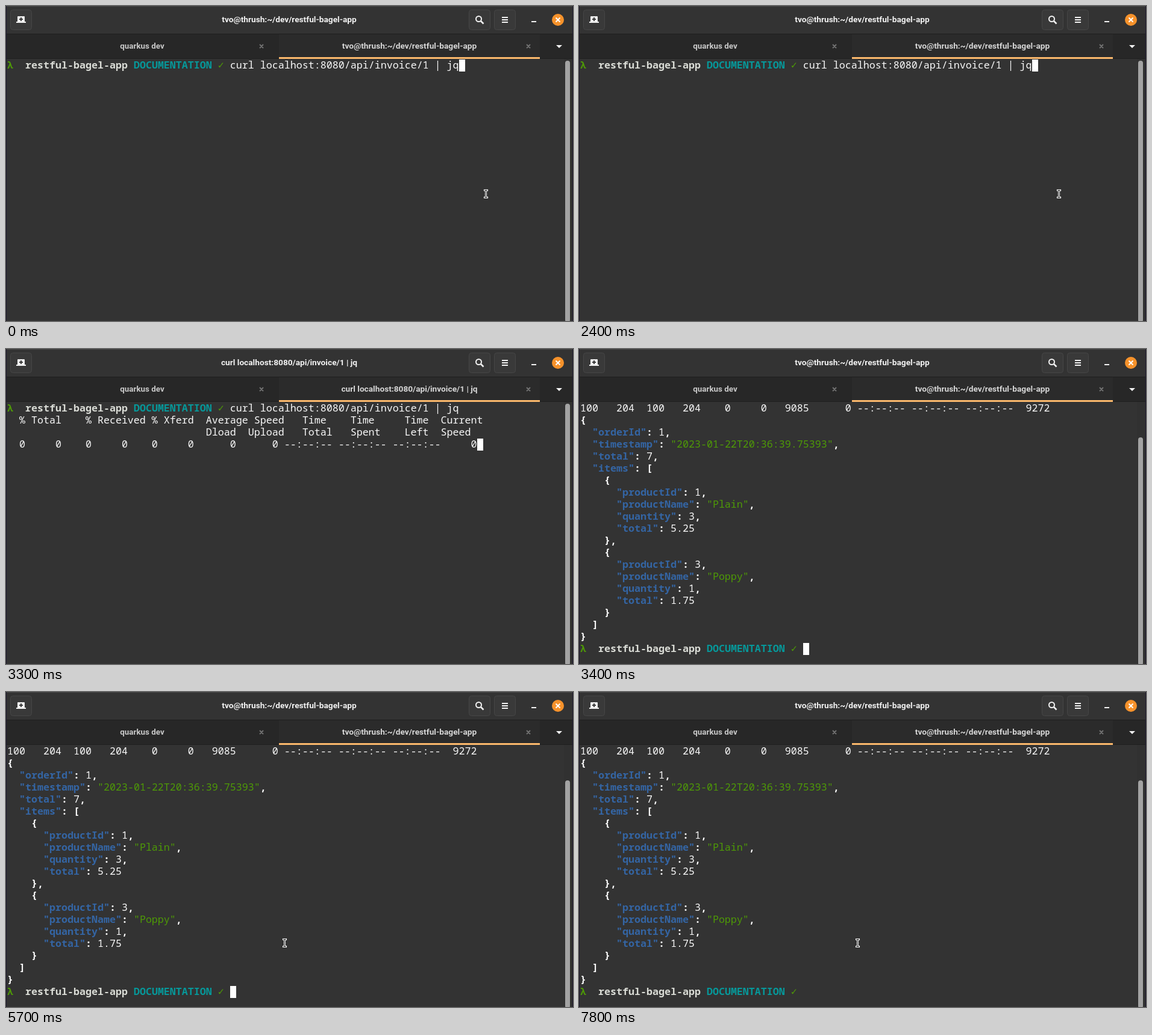
Write an HTML page that moves like this. It is 941 px wide and 524 px high and loops after 8 s.

```html
<!DOCTYPE html>
<html lang="en">
<head>
<meta charset="utf-8">
<title>Terminal</title>
<style>
  html, body { margin: 0; width: 100%; height: 100%; overflow: hidden; background: #333; }
  #stage { position: relative; width: 941px; height: 524px; overflow: hidden; background: #333; }
  svg { position: absolute; left: 0; top: 0; }
  svg text { font: 700 13.4px Roboto, "Open Sans", sans-serif; text-anchor: middle; }
  #title, #tab { font-size: 13.7px; }
  #term { position: absolute; left: 1px; top: 88px; width: 939px; height: 436px; overflow: hidden; }
  #gutter { position: absolute; right: 0; top: 0; width: 14px; height: 100%; background: #313131; }
  #bar { position: absolute; left: 927px; width: 8px; border-radius: 4px; background: #a3a3a3; }
  #rows { position: absolute; left: 1px; top: 0; }
  #rows div {
    height: 20px; line-height: 20px; white-space: pre; color: #f8f8f8;
    font-family: "Noto Sans Mono", "DejaVu Sans Mono", monospace; font-size: 16.6667px;
    font-variant-ligatures: none;
  }
  #cursor { position: absolute; width: 10px; height: 20px; background: #fff; }
  b { font-weight: 700; color: #fff; }
  .dir { color: #d9dbd5; }
  .branch { color: #06989a; }
  .key { color: #3465a4; }
  .str { color: #4e9a06; }
  .tick { display: inline-block; width: 10px; }
</style>
</head>
<body>
<div id="stage">
  <div id="term">
    <div id="gutter"></div>
    <div id="rows"></div>
    <div id="cursor"></div>
    <div id="bar"></div>
  </div>
  <svg width="941" height="524" viewBox="0 0 941 524">
    <!-- header and tab strip -->
    <rect width="941" height="46" fill="#333"/>
    <rect width="941" height="1" fill="#474747"/>
    <rect y="46" width="941" height="1" fill="#1f1f1f"/>
    <rect y="47" width="941" height="41" fill="#272727"/>
    <rect x="453" y="47" width="433" height="41" fill="#2b2b2b"/>
    <rect y="87" width="941" height="1" fill="#1f1f1f"/>
    <rect x="453" y="85" width="433" height="3" fill="#fbb86c"/>

    <g fill="#393939" stroke="#464646">
      <rect x="7.5" y="6.5" width="35" height="33" rx="4"/>
      <rect x="768.5" y="6.5" width="35" height="33" rx="4"/>
      <rect x="810.5" y="6.5" width="35" height="33" rx="4"/>
    </g>
    <path d="M20 17h10a1 1 0 0 1 1 1v8h2v2H17v-2h2v-8a1 1 0 0 1 1-1z" fill="#f2f2f2"/>
    <path d="M25 19v6M22 22h6" stroke="#393939" stroke-width="2"/>
    <g fill="none" stroke="#f2f2f2" stroke-width="2">
      <circle cx="784.5" cy="21.5" r="4.5"/>
      <path d="M788 25l4.500 4.500" stroke-width="2.500"/>
      <path d="M823 19h10M823 23h10M823 27h10M872 26h8"/>
    </g>
    <circle cx="916" cy="23" r="10" fill="#f6922b"/>
    <path d="M912.500 19.500l7 7m0-7l-7 7" stroke="#fff" stroke-width="2"/>
    <path d="M421 64l6 6m0-6l-6 6M864 64l6 6m0-6l-6 6" stroke="#737373" stroke-width="1.800"/>
    <path d="M913 65h10l-5 5z" fill="#f2f2f2"/>

    <text id="title" x="470" y="27" fill="#f2f2f2"/>
    <text x="226" y="71" fill="#c8c8c8">quarkus dev</text>
    <text id="tab" x="669.5" y="71" fill="#d6d6d6"/>

    <rect width="1" height="524" fill="#1a142b"/>
    <rect x="940" width="1" height="524" fill="#1a142b"/>

    <g id="mouse" fill="none">
      <path d="M-3.500-6h7M0-6v12M-3.500 6h7" stroke="#fff" stroke-width="3"/>
      <path d="M-2.500-6h5M0-6v12M-2.500 6h5" stroke="#222"/>
    </g>
  </svg>
</div>
<script>
const $ = id => document.getElementById(id);
const LOOP = 8000;
const COMMAND = 'curl localhost:8080/api/invoice/1 | jq';
const SHELL = 'tvo@thrush:~/dev/restful-bagel-app';

const prompt = '<b class="str">λ</b>  <b class="dir">restful-bagel-app</b> ' +
  '<b class="branch">DOCUMENTATION</b> <span class="str tick">✓</span> ';

const heading = [
  '  % Total    % Received % Xferd  Average Speed   Time    Time     Time  Current',
  ' '.repeat(33) + 'Dload  Upload   Total   Spent    Left  Speed'
];

// Right-aligns each value at its column's end.
const ends = [3, 9, 14, 20, 25, 31, 38, 45, 54, 63, 72, 78];
const stats = values => values.reduce((line, v, i) =>
  line + String(v).padStart(ends[i] - line.length), '');
const none = '--:--:--';

const invoice = {
  orderId: 1,
  timestamp: '2023-01-22T20:36:39.75393',
  total: 7,
  items: [
    { productId: 1, productName: 'Plain', quantity: 3, total: 5.25 },
    { productId: 3, productName: 'Poppy', quantity: 1, total: 1.75 }
  ]
};

const paint = json => json.replace(/("\w+")(?=:)|("[^"]*")|([{}[\]:,]+)/g,
  (all, key, str) => key ? `<b class="key">${key}</b>`
    : str ? `<span class="str">${str}</span>` : `<b>${all}</b>`);

const running = [prompt + COMMAND, ...heading,
  stats([0, 0, 0, 0, 0, 0, 0, 0, none, none, none, 0])];
const done = [prompt + COMMAND, ...heading,
  stats([100, 204, 100, 204, 0, 0, 9085, 0, none, none, none, 9272]),
  ...paint(JSON.stringify(invoice, null, 2)).split('\n'), prompt];

// Each scene: start, lines, scrolled rows, cursor column and row, title.
const scenes = [
  { at: 0, lines: [prompt + COMMAND], top: 0, col: 75, row: 0, title: SHELL },
  { at: 3300, lines: running, top: 0, col: 78, row: 3, title: COMMAND },
  { at: 3400, lines: done, top: 3, col: 37, row: 23, title: SHELL },
  { at: 6000, lines: done, top: 0, col: 37, row: 23, title: SHELL },
  { at: 7800, lines: done, top: 3, col: 37, row: 23, title: SHELL }
];
const blinks = [600, 1200, 1800, 2400, 3000, 3300, 3900, 4500, 5100, 5700, 7800];
const pointer = [
  [0, 796.5, 312.5], [3300, -50, -50], [4800, 783.5, 326.5], [4900, 687.5, 353.5],
  [5000, 583.5, 382.5], [5100, 500.5, 406.5], [5200, 462.5, 417.5]
];
const VISIBLE = 21, TRACK = 448, INSET = 13;

let shown;
function show(scene) {
  if (scene === shown) return;
  shown = scene;
  const { lines, top, col, row, title } = scene;
  $('rows').innerHTML = lines.map(line => `<div>${line}</div>`).join('');
  $('rows').style.top = -20 * top + 'px';
  $('cursor').style.left = 1 + 10 * col + 'px';
  $('cursor').style.top = 1 + 20 * (row - top) + 'px';
  const total = Math.max(VISIBLE, lines.length);
  $('bar').style.top = 3 + TRACK * top / total + 'px';
  $('bar').style.height = TRACK * VISIBLE / total - INSET + 'px';
  $('title').textContent = $('tab').textContent = title;
}

function draw(now) {
  const t = Math.max(0, now - start) % LOOP;
  show(scenes.filter(s => s.at <= t).pop());
  const lit = blinks.filter(b => b <= t).length % 2 === 0;
  $('cursor').style.visibility = lit ? 'visible' : 'hidden';
  const [, x, y] = pointer.filter(p => p[0] <= t).pop();
  $('mouse').setAttribute('transform', `translate(${x} ${y})`);
  requestAnimationFrame(draw);
}
const start = performance.now();
draw(start);
</script>
</body>
</html>
```
